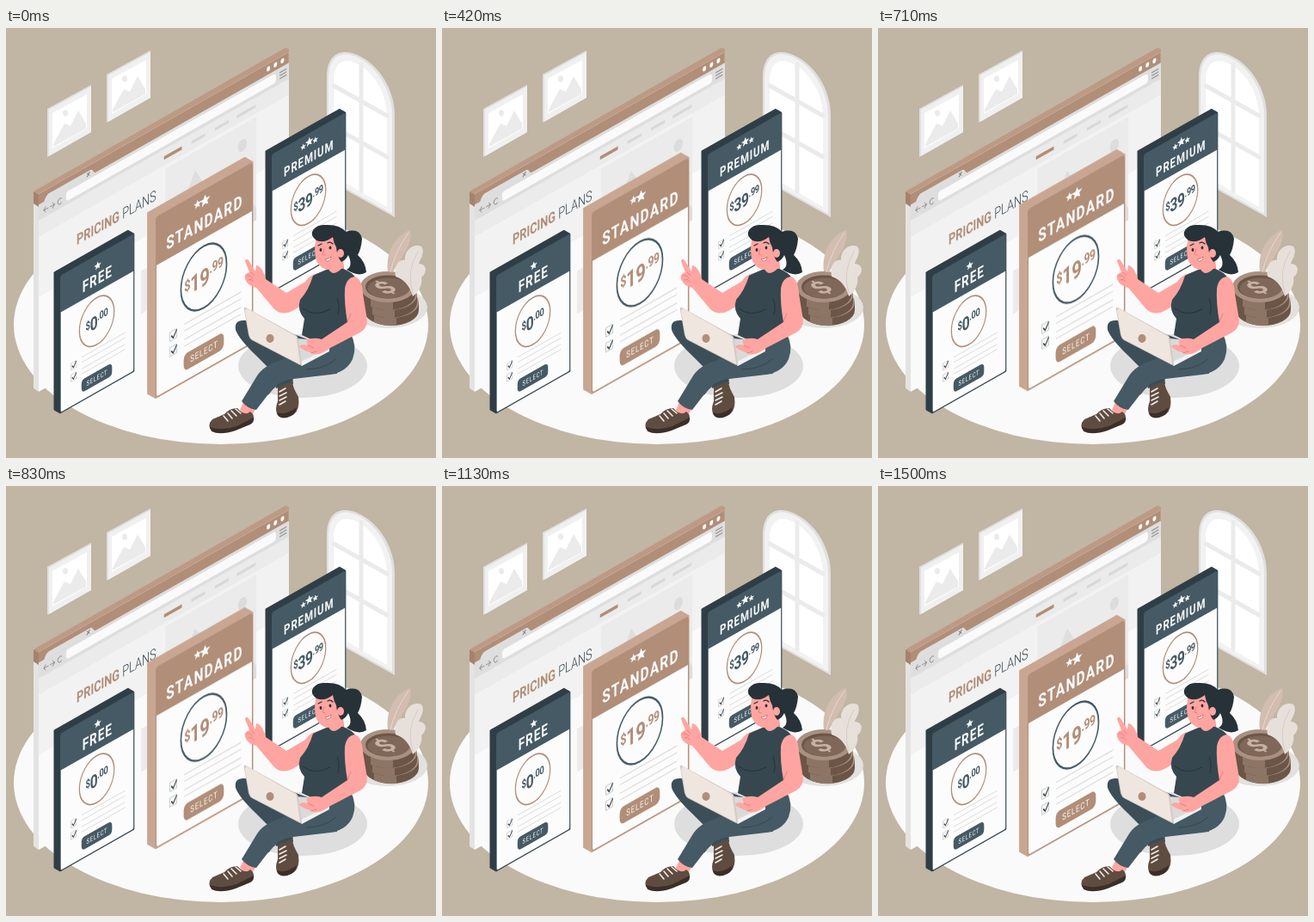
An HTML page that plays this animation: 500x500 px, repeating every 1.54 s.

```html
<!DOCTYPE html>
<html lang="en">
<head>
<meta charset="utf-8">
<title>Pricing plans</title>
<style>
  html, body { margin: 0; width: 100%; height: 100%; overflow: hidden; background: #c1b5a3; }
  svg { display: block; width: 100vw; height: 100vh; }
  text { font-family: Roboto, "Open Sans", sans-serif; }
  .title { font-weight: 700; fill: #fafafa; text-anchor: middle; letter-spacing: 1.2px; }
  .price { font-weight: 700; text-anchor: middle; letter-spacing: -.5px; }
  .select { font-size: 8px; fill: #fafafa; text-anchor: middle; letter-spacing: .9px; }
  .line { fill: none; stroke-linecap: round; stroke-linejoin: round; }
  .skin { fill: #ffa5a1; }
  .crease { stroke: #ea7f7f; }
  #standard { animation: float 770ms cubic-bezier(.37, 0, .63, 1) infinite alternate; }
  @keyframes float { to { transform: translateY(-9px); } }
</style>
</head>
<body>
<svg viewBox="0 0 500 500">
  <defs>
    <path id="star" d="M0-5L1.4-1.7 5-1.5 2.2.8 3.1 4.3 0 2.4-3.1 4.3-2.2.8-5-1.5-1.4-1.7Z" fill="#fafafa"/>
    <g id="picture">
      <path d="M0 28L51 0V55L0 84Z" fill="#e0e0e0"/>
      <path d="M2 29L51 2V55L2 83Z" fill="#f0f0f0"/>
      <path d="M6 33L46 11V51L6 74Z" fill="#fff"/>
      <path d="M7 69L20 45 27 48 36 30 45 45V51L7 72Z" fill="#ebebeb"/>
      <ellipse cx="21" cy="33" rx="3" ry="3.8" fill="#ebebeb"/>
    </g>
  </defs>

  <rect width="500" height="500" fill="#c1b5a3"/>
  <ellipse cx="250" cy="345" rx="241" ry="139" fill="#fafafa"/>
  <use href="#picture" x="48" y="66"/>
  <use href="#picture" x="117" y="26"/>

  <g id="window">
    <path d="M373 176V57C373 29 391 22 412 33C436 45 452 74 452 101V220Z" fill="#e0e0e0"/>
    <path d="M375 175V58C375 31 392 25 411 35C433 47 449 75 449 102V216Z" fill="#f2f2f2"/>
    <path d="M381 172V61C381 39 394 33 411 43C430 54 443 79 443 103V208Z" fill="#fff"/>
    <path d="M413 42V190M381 67L443 102M381 115L443 150" class="line" stroke="#ebebeb" stroke-width="5"/>
  </g>

  <g id="page">
    <path d="M32 189L38 193V423L32 419Z" fill="#e3e3e3"/>
    <path d="M32 190L323 24Q327 22 329 25V40L38 207 32 204Z" fill="#bd9a85"/>
    <path d="M32 190L38 194V208L32 204Z" fill="#a5826d"/>
    <g transform="matrix(.74 -.42 0 1 38 193)">
      <rect width="393" height="230" fill="#fafafa"/>
      <rect width="393" height="13" fill="#b18e78"/>
      <path d="M8 13Q12 6 16 6H80Q84 6 86 10L89 13Z" fill="#dedede"/>
      <path d="M76 8l4 4m0-4l-4 4" class="line" stroke="#77706b"/>
      <rect y="12.500" width="393" height="19" fill="#dedede"/>
      <rect x="43" y="16" width="330" height="11" rx="4" fill="#fafafa"/>
      <path d="M15 22.500H8l3-3m-3 3l3 3M18 22.500h7l-3-3m3 3l-3 3M36 20a3.500 3.500 0 1 0 0 5" class="line" stroke="#8f8f8f"/>
      <path d="M379 18h10m-10 3.500h10m-10 3.500h10" class="line" stroke="#8f8f8f" stroke-width="1.300"/>
      <g fill="#fafafa"><circle cx="361" cy="6" r="2.800"/><circle cx="372" cy="6" r="2.800"/><circle cx="383" cy="6" r="2.800"/></g>
      <rect y="31" width="393" height="19" fill="#ebebeb"/>
      <rect y="50" width="393" height="70" fill="#f2f2f2"/>
      <rect x="197" y="39" width="28" height="4" fill="#b18e78"/>
      <path d="M240 41h22M277 41h22M311 41h30" stroke="#d8d8d8" stroke-width="3.500"/>
      <rect x="199" y="54" width="143" height="120" fill="#ebebeb"/>
      <path d="M199 150L246 76 275 120 295 100 342 160V174H199Z" fill="#dedede"/>
      <circle cx="320" cy="78" r="7" fill="#dcdcdc"/>
      <rect x="161" y="157" width="70" height="50" fill="#ebebeb"/>
      <text x="59.500" y="84.500" font-size="17.300" fill="#b18e78" font-weight="700">PRICING <tspan fill="#37474f" font-weight="300">PLANS</tspan></text>
    </g>
  </g>

  <g id="cards"></g>

  <g id="coins">
    <ellipse cx="444" cy="325" rx="46" ry="24" fill="#e3e1de"/>
    <g id="stack"></g>
    <ellipse cx="444" cy="301" rx="26" ry="13.500" fill="#6b5547"/>
    <ellipse cx="445" cy="302.500" rx="24.500" ry="12" fill="#7f685a"/>
    <text font-size="32" font-weight="700" fill="#c8b1a2" text-anchor="middle" transform="matrix(.85 -.36 .72 .5 441 302) translate(0 11)">$</text>
  </g>

  <g id="leaves">
    <path d="M444 283C441 260 454 240 470 235C474 250 461 264 450 284Z" fill="#d2bdb0"/>
    <path d="M447 283Q453 259 468 238" class="line" stroke="#e6d8cf"/>
    <path d="M453 289C451 277 456 268 464 270C463 259 473 250 483 254C488 261 481 270 480 274C490 275 490 284 483 290C485 299 478 309 473 312Q468 294 453 289Z" fill="#e7e0da"/>
    <path d="M473 308Q465 283 479 260" class="line" stroke="#d6cbc3"/>
  </g>

  <g id="woman">
    <ellipse cx="345" cy="393" rx="75" ry="37" fill="#dedede"/>

    <path d="M278 340Q265 339 267 351Q271 362 291 381L313 403 314 419 334 414Q334 401 322 389L345 405 385 402 372 370 305 345Z" fill="#3c4f58"/>
    <path d="M316 418L333 411Q333 417 340 429Q342 443 335 449Q323 456 316 450Q312 444 316 434Z" fill="#5f4c40"/>
    <path d="M315 447Q325 451 338 441Q337 450 327 453Q316 455 315 447Z" fill="#3b2f28"/>
    <path d="M318 423l7-4m-7 9l8-4m-8 9l8-4m-8 9l7-4" class="line" stroke="#f2ece8" stroke-width="1.600"/>

    <path class="skin" d="M278 431L272 444Q279 453 286 450L293 439Z"/>
    <path d="M400 354Q409 370 403 385Q396 400 377 403L334 408Q317 411 308 422L291 444Q281 443 274 434L291 406Q299 392 321 386L348 373Z" fill="#455a64"/>
    <path d="M333 409Q315 411 305 426M349 397Q370 397 384 385" class="line" stroke="#37474f"/>
    <path d="M269 442Q260 442 254 449L240 455Q234 461 238 467Q251 473 268 467L287 457Q290 450 284 446Q278 452 269 442Z" fill="#5f4c40"/>
    <path d="M237 464Q252 469 268 463L288 453Q289 458 284 461L267 468Q249 474 239 469Z" fill="#3b2f28"/>
    <path d="M253 451l5 6m0-9l5 6m-1-9l6 6m-1-8l6 5" class="line" stroke="#f2ece8" stroke-width="1.600"/>

    <path class="skin" d="M363 285Q354 286 348 295L326 308 302 292Q300 282 294 277L291 276 290 283 282 270Q279 267 278 271L283 284Q276 286 278 292Q281 300 291 302L312 327Q321 335 333 329L352 318Z"/>
    <path d="M285 284l4 4m-9 0q4-2 7 3m-5 2q3-2 6 2" class="line crease"/>

    <path d="M377 270L374 286Q381 296 394 286L391 263Z" fill="#f28f8f"/>
    <path d="M363 285Q370 282 375 280L392 280Q403 284 407 291L405 323Q399 337 402 360Q376 374 344 357L347 338Q338 328 342 316Q352 305 357 288Z" fill="#37474f"/>
    <path class="skin" d="M374 278Q379 292 392 278L391 270H377Z"/>
    <path d="M345 326Q358 337 377 327M385 315Q389 323 386 333" class="line" stroke="#263238"/>

    <path class="skin" d="M361 243Q357 259 361 271Q366 280 374 281Q386 277 391 266L388 242Q372 232 361 243Z"/>
    <path d="M361 247Q353 241 357 235Q362 228 371 229Q388 228 395 237Q411 232 414 245Q413 257 409 264Q418 272 419 284Q410 290 396 281Q404 277 398 264Q396 269 390 272Q385 266 384 255Q381 250 380 243Q370 251 361 247Z" fill="#263238"/>
    <ellipse class="skin" cx="389" cy="262" rx="4" ry="5"/>
    <g fill="#263238"><ellipse cx="366" cy="258" rx="1.400" ry="2"/><ellipse cx="377" cy="255.500" rx="1.400" ry="2"/></g>
    <path d="M363 253l4-2m7-1q3-2 6 1" class="line" stroke="#263238" stroke-width="1.300"/>
    <path d="M370 257l-2 6 3 1" class="line crease"/>
    <path d="M371 269Q375 269 378 266Q378 271 373 271Z" fill="#fafafa" stroke="#c95f62" stroke-width=".8"/>

    <path d="M339 361L372 364 376 374 343 393Z" fill="#dadada"/>
    <path d="M343 388L376 372V376L344 393Z" fill="#f2f2f2"/>
    <path class="skin" d="M406 289Q414 292 415 309L420 340Q420 349 412 354L377 372Q363 383 355 378Q348 376 341 371Q342 367 351 369L349 363Q358 359 367 362L397 342Q393 319 394 303Q396 290 406 289Z"/>
    <path d="M397 342L401 332M351 369l7 3m-3 6l6-2" class="line crease"/>
    <path d="M279 325L337 357Q340 359 340 362L344 391 342 392 286 363Q283 361 282 357L277 328Q276 324 279 325Z" fill="#d5cbc5"/>
    <path d="M280 326L336 358Q338 359 338 362L342 391 286 362Q284 361 283 357L278 329Z" fill="#f0e6e0"/>
    <ellipse cx="307" cy="361" rx="4.500" ry="5" fill="#b18e78"/>
  </g>
</svg>

<script>
  const DARK = '#455a64', BROWN = '#b18e78';
  const W = 116, H = 160, HEAD = 43, KX = .74, KY = .42;

  const star = ([x, y, k]) => `<use href="#star" transform="translate(${x} ${y}) scale(${k * 1.2} ${k})"/>`;

  const feature = y => `
    <rect x="17" y="${y - 4}" width="8" height="8" fill="#fafafa" stroke="#c4c4c4" stroke-width=".7"/>
    <path d="M19 ${y}l2 2.500 4-5.500" class="line" stroke="#37474f" stroke-width="1.300"/>
    <path d="M34 ${y - 4}h68m-68 6h68" stroke="#dcdcdc"/>`;

  function card({ id, x, y, scale = 1, main, side, accent, title, size, stars, whole, cents }) {
    const r = W * KX, up = W * KY;
    const body = `M-7-4L${r - 7} ${-up - 4} ${r} ${-up}V${H - up}L0 ${H} -7 ${H - 4}Z`;
    return `<g id="${id}"><g transform="translate(${x} ${y}) scale(${scale})">
      <path d="${body}" fill="${side}" stroke="${side}" stroke-linejoin="round"/>
      <g transform="matrix(${KX} ${-KY} 0 1 0 0)">
        <rect width="${W}" height="${H}" rx="3" fill="${main}"/>
        <path d="M1 ${HEAD}H${W - 1}V${H - 3}q0 2-2 2H3q-2 0-2-2Z" fill="#fcfcfc"/>
        ${stars.map(star).join('')}
        <text class="title" x="58.500" y="34.500" font-size="${size}">${title}</text>
        <circle cx="57.500" cy="77" r="27.300" fill="none" stroke="${accent}" stroke-width="1.700"/>
        <text class="price" x="57.500" y="81" font-size="13" fill="${main}">$<tspan dy="4" font-size="21">${whole}</tspan><tspan dy="-8" font-size="12.500">.${cents}</tspan></text>
        ${feature(113)}${feature(126.5)}
        <rect x="33.500" y="135.500" width="48" height="15" rx="5" fill="${main}"/>
        <text class="select" x="58" y="145.800">SELECT</text>
      </g>
    </g></g>`;
  }

  const dark = { main: DARK, side: '#2f3e46', accent: BROWN };
  document.getElementById('cards').innerHTML = [
    { id: 'premium', x: 309, y: 147, ...dark, title: 'PREMIUM', size: 15.5, whole: '39', cents: '99',
      stars: [[49.5, 12, .75], [59, 10, 1.05], [68.5, 12, .75]] },
    { id: 'free', x: 63, y: 288, ...dark, title: 'FREE', size: 18.5, whole: '0', cents: '00',
      stars: [[59, 13, .95]] },
    { id: 'standard', x: 174, y: 220, scale: 1.315, main: BROWN, side: '#c8a692', accent: DARK,
      title: 'STANDARD', size: 16, whole: '19', cents: '99',
      stars: [[50, 9.5, .75], [59, 10, 1.05]] }
  ].map(card).join('');

  const coin = ([x, y]) => `
    <path d="M${x - 32} ${y}v9a32 18 0 0 0 64 0v-9Z" fill="#6b5547"/>
    <path d="M${x - 20} ${y + 14}v9q11 5 26 4v-9Z" fill="#8d7566"/>
    <ellipse cx="${x}" cy="${y}" rx="32" ry="18" fill="#a99080"/>`;
  document.getElementById('stack').innerHTML = [[448, 319], [446, 310], [444, 301]].map(coin).join('');
</script>
</body>
</html>
```
